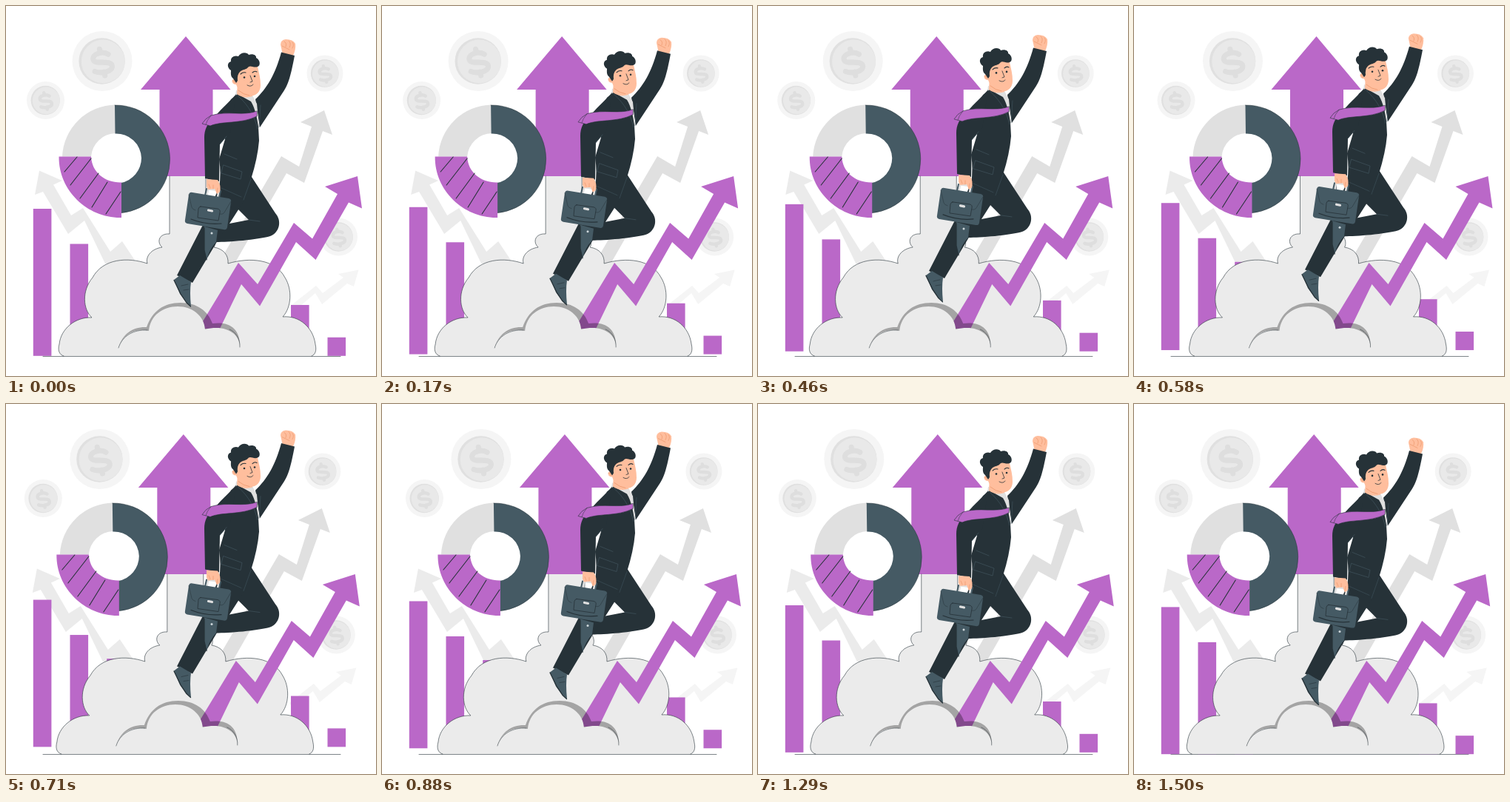
Animation, 500 px wide and 500 px high, one loop 1540 ms. Source, as an HTML page with a canvas:

```html
<!DOCTYPE html>
<html lang="en">
<head>
<meta charset="utf-8">
<title>Career growth</title>
<style>
html, body { margin: 0; width: 100%; height: 100%; overflow: hidden; background: #fff; }
canvas { display: block; width: 100vw; height: 100vh; }
</style>
</head>
<body>
<canvas id="stage"></canvas>
<script>
const LOOP = 1540;
const PURPLE = '#ba68c8', DARK = '#263238', SLATE = '#455a64', SMOKE = '#ebebeb';
const SKIN = '#ffbe9d', SKIN_LINE = '#eb996e';

const canvas = document.getElementById('stage');
const ctx = canvas.getContext('2d');
const ratio = window.devicePixelRatio || 1;
canvas.width = canvas.height = 500 * ratio;
ctx.lineCap = ctx.lineJoin = 'round';

const paths = new Map();
function path(d) {
  if (!paths.has(d)) paths.set(d, new Path2D(d));
  return paths.get(d);
}
function fill(d, color) {
  ctx.fillStyle = color;
  ctx.fill(path(d));
}
function line(d, color = DARK, width = 0.6) {
  ctx.strokeStyle = color;
  ctx.lineWidth = width;
  ctx.stroke(path(d));
}
function disc(x, y, r, color) {
  ctx.fillStyle = color;
  ctx.beginPath();
  ctx.arc(x, y, r, 0, Math.PI * 2);
  ctx.fill();
}
function shifted(dx, dy, draw) {
  ctx.save();
  ctx.translate(dx, dy);
  draw();
  ctx.restore();
}

function coin(x, y, r) {
  disc(x, y, r, '#f5f5f5');
  disc(x - r * 0.01, y, r * 0.77, '#e0e0e0');
  disc(x + r * 0.03, y + r * 0.01, r * 0.725, '#e9e9e9');
  ctx.save();
  ctx.translate(x, y + r * 0.04);
  ctx.scale(r / 40, r / 40);
  ctx.rotate(-0.2);
  line('M10-9C4-15-11-14-11-6C-11 2 12-2 12 7C12 15-4 15-12 10M0-18V-13M0 13V18', '#dedede', 7);
  ctx.restore();
}

function backdrop() {
  coin(130, 74.5, 40.5);
  coin(53.5, 127.5, 25.5);
  coin(431, 91, 24.5);
  coin(449.5, 312, 25.5);
  fill('M430 141L398 157 413 163 396 217 372 203 287 348H309L379 226 403 239 428 169 441 174Z', '#e0e0e0');
  fill('M45 222.5L76 236 64 241.5 88 283 104 273 141 332 157 318 177 348H134L106 290 84 308 50 251 39 255Z', SMOKE);
  fill('M476.5 356.5L449 362 456 367 428 388 419 378 386 404 391 411 418 388 427 403 461 375 470 379Z', '#f5f5f5');
}

function bars() {
  const tops = [274, 321.5, 353.6];
  ctx.fillStyle = PURPLE;
  tops.forEach((top, i) => ctx.fillRect(36.8 + i * 49.7, top, 24.6, 472.8 - top));
  ctx.fillRect(385, 404, 24.6, 68.8);
  ctx.fillRect(434.5, 447.8, 24.6, 25);
}

function rocketArrow() {
  fill('M243 41L303.5 113H279.5V230H207.5V113H182Z', PURPLE);
}

function donut() {
  const rim = 'M147 134A73 73 0 0 1 221.5 206.5A73 73 0 0 1 155 279.8';
  fill('M76 203.5A73 73 0 0 1 148 133.5V172A34 34 0 0 0 115 203.5Z', '#e0e0e0');
  fill(rim + 'V239A34 34 0 0 0 183 205.5A34 34 0 0 0 147.5 172.5Z', SLATE);
  line(rim, DARK, 0.5);
  fill('M71.5 203.5H115C116 225 134 239 156 238.5V286C111 287 71 250 71.5 203.5Z', PURPLE);
  line('M79 224L96 204M87 242L115 206M100 260L125 226M116 272L137 238M135 281L155 251', DARK, 1.1);
}

const LEFT_PUFF = 'M78 473C71 471 70 464 72 457C74 436 94 420 116 421C104 410 102 385 117 367C131 341 165 339 191 348C188 338 197 328 211 326C203 319 207 307 221 308';
const RIGHT_PUFF = 'C283 308 284 322 281 326C294 328 301 337 300 348C330 339 364 342 377 367C387 383 386 407 374 420C396 418 415 434 418 457C420 466 418 471 413 473';

function smoke() {
  fill(LEFT_PUFF + 'V230H270V307' + RIGHT_PUFF + 'Z', SMOKE);
  line(LEFT_PUFF + 'V230M270 230V307' + RIGHT_PUFF);
}

function growthArrow() {
  fill('M475 230L431 244 448 254 414 314.5 389 293 340 376 314 347 260 436 289 436 318 376 343 405.5 392 319 418.5 343 463 265.5 481 273.5Z', PURPLE);
}

function frontSmoke() {
  const top = 'M152 462C158 444 174 435 193 439C195 418 212 406 232 406C252 406 268 419 269 437C296 430 316 442 316 461';
  fill('M152 462C157 443 172 433 190 434C198 412 213 401 236 401C258 401 273 412 279 429C302 426 317 436 316 461Z', 'rgba(0,0,0,.3)');
  fill(top + 'L316 468H152Z', SMOKE);
  line('M152 462C157 446 172 437 191 438M316 461C317 450 310 440 302 437', DARK, 0.5);
}

function legs() {
  fill('M330 228L364 280C373 290 370 306 357 311C340 316 300 319 284 319L278 297 302 294 328 289 314 275 296 240Z', DARK);
  fill('M290 240L325 258 302 294 286 317 252 374 231 364 268 292Z', DARK);
  line('M328 289L343 291', SLATE, 0.6);
  fill('M268 298L286 303 284 319Q275 328 271 343L268 330Z', SLATE);
  line('M268 300V330L271 343', DARK, 1.2);
  disc(278, 307, 1.5, '#cfd8dc');
  fill('M227 370L235 364 250 373Q248 386 250 406L244 401 235 389Z', SLATE);
  line('M227 370.5L236 389 244 401 249.5 406', DARK, 1.3);
  line('M237 378L246 376M240 384L247 383', DARK, 0.6);
}

function raisedArm() {
  fill('M374 66L371 52Q371 46 378 45Q388 45 391 51Q392 58 388 67Z', SKIN);
  line('M376 48Q380 50 378 55M382 47Q386 50 383 56M387 49Q390 52 387 57M373 54Q379 57 383 59', SKIN_LINE, 0.7);
  fill('M337 126C353 111 364 92 372 62.5L390 67C385 93 382 106 374 117L343 164Z', DARK);
}

function torso() {
  fill('M311 114L331 117 339 132 342 164 332 162 309 128Z', '#e0e0e0');
  fill('M313 119L331 129C337 139 339 151 341 163L342 182Q340 206 331 234L321 262 288 246Q291 226 288 207L296 180 292 150 304 126Z', DARK);
  fill('M311 119C304 128 293 136 282 150C272 158 268 167 268 178L269 233 288 237 289 187 303 171Z', DARK);
  line('M313 121C329 135 336 150 340 166M289 187L298 176M295 200L312 207M294 215L319 224 317 234 291 226Z', SLATE, 0.6);
  line('M342 164L344 134M321 262L331 234M318 258L291 246', SLATE, 0.5);
  const tie = 'M339 142C322 149 299 141 277 148Q269 152 265 159L276 162C291 155 318 160 339 149Z';
  fill(tie, PURPLE);
  line(tie);
  line('M277 148Q271 155 270 160', DARK, 0.5);
}

function head() {
  fill('M313 101L312 119Q322 126 333 122L333 105Z', SKIN);
  fill('M311 88C316 78 332 74 340 82C342 91 344 98 344 107C344 117 337 122 330 121C320 120 314 114 311 106C304 106 304 98 310 98Z', SKIN);
  line('M314 114Q321 120 329 121', SKIN_LINE, 0.8);
  fill('M311 104L307 98C303 95 304 90 304 87C298 83 299 76 304 75C303 69 309 66 314 68C317 62 326 62 328 66C334 64 339 67 338 70C344 73 344 81 340 82C335 84 331 80 328 82C324 87 320 85 316 89Q312 93 313 101Z', DARK);
  disc(322, 96.5, 1.3, DARK);
  disc(336, 95, 1.3, DARK);
  line('M317 92Q320 89 324 90M333 90Q336 87 339 89', DARK, 1.1);
  line('M330 94L333 102 330 103M326 107Q331 110 334 106', DARK, 0.8);
  line('M306 101Q309 100 309 104', SKIN_LINE, 0.7);
}

function briefcase() {
  line('M271 256L273 247 288 249 286 259', '#e0e0e0', 3);
  line('M269 256L271 247M288 259L290 250', SLATE, 2);
  fill('M271 234L286 235Q291 242 289 251L285 254 282 247 273 248 271 244Z', SKIN);
  line('M276 246L274 241M280 247L280 242M285 252L286 246', SKIN_LINE, 0.7);
  fill('M252 252L301 260Q305 261 304 265L299 299Q298 303 294 302L245 294Q241 293 242 289L247 255Q248 251 252 252Z', SLATE);
  line('M247 255L251 272Q252 275 256 276M304 264L295 279Q293 282 289 281', DARK, 0.5);
  line('M263 271L286 274Q290 275 289 279L287 290 259 286 260 274Q261 271 263 271Z', DARK, 0.8);
  line('M250 288Q270 296 291 294', DARK, 1.2);
  line('M273.5 276L278.5 277', '#e0e0e0', 3.2);
}

function man() {
  legs();
  raisedArm();
  torso();
  head();
  briefcase();
}

// Sideways rattle: one stop for every tenth of the cycle.
const SHAKE = [0, -1, 2, -4, 4, -4, 4, -4, 2, -1, 0];
function shake(p) {
  const i = Math.min(9, Math.floor(p * 10));
  return SHAKE[i] + (SHAKE[i + 1] - SHAKE[i]) * (p * 10 - i);
}
function hover(p) {
  return -10 * (1 - Math.abs(1 - 2 * p));
}

// 24 steps per second, with step times rounded to 10 ms.
function progress(time) {
  const step = Math.floor((Math.floor(time / 10) * 10 + 4.9) * 0.024);
  return Math.min(1, 0.02 + step / 36);
}

function render(now) {
  const p = progress(now % LOOP);
  const dx = shake(p) + 0.2, dy = hover(p) + 0.4;
  ctx.setTransform(ratio, 0, 0, ratio, 0, 0);
  ctx.fillStyle = '#fff';
  ctx.fillRect(0, 0, 500, 500);
  shifted(dx, 0, backdrop);
  line('M50 473.5H452', DARK, 0.6);
  shifted(0, dy, bars);
  shifted(dx, 0, () => {
    rocketArrow();
    donut();
    smoke();
    growthArrow();
    frontSmoke();
  });
  shifted(0, dy, man);
}

const start = performance.now();
function tick() {
  render(performance.now() - start);
  requestAnimationFrame(tick);
}
tick();
</script>
</body>
</html>
```
